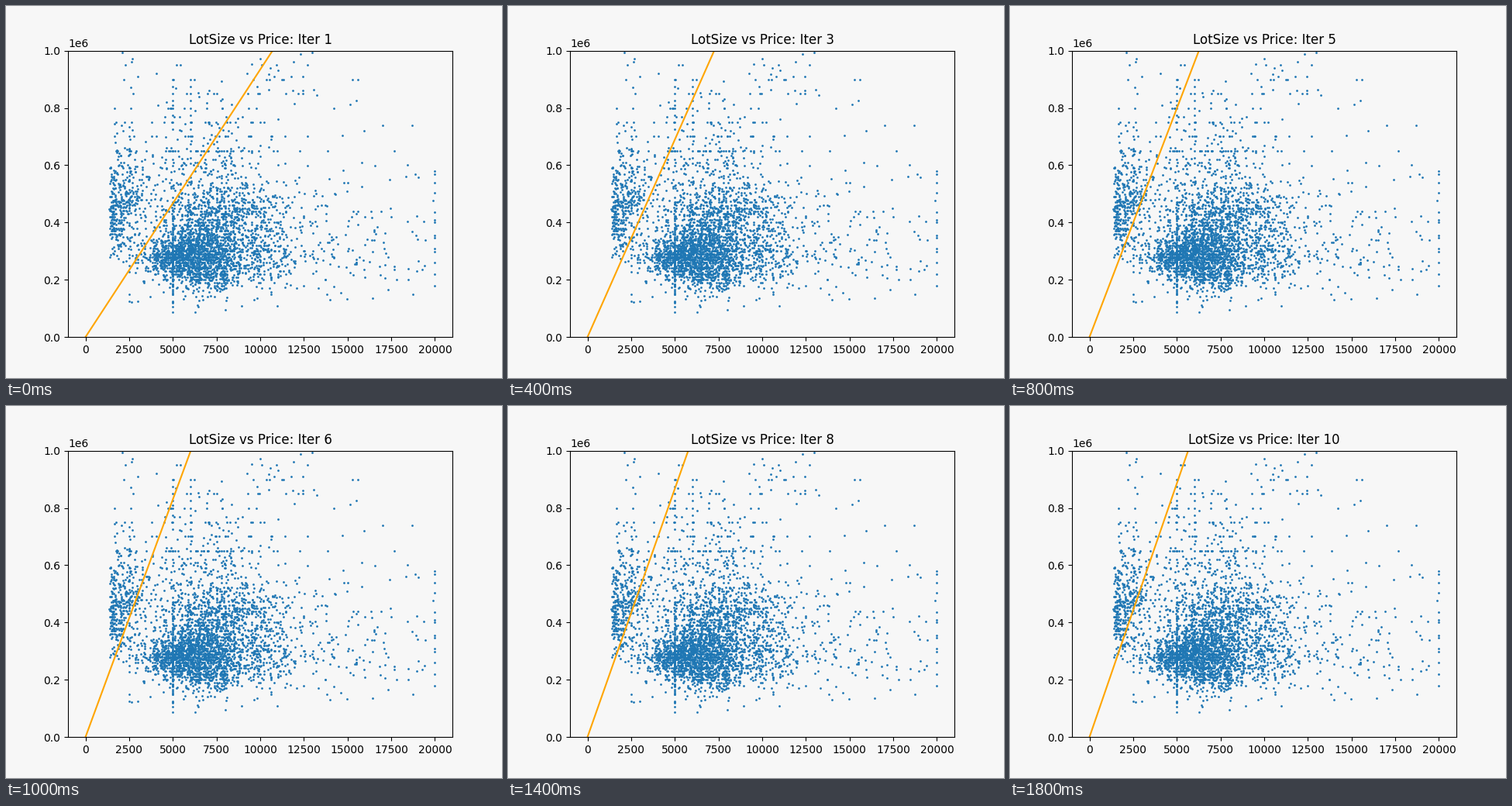
A matplotlib script that plays this animation: 640 by 480 pixels, repeating every 2.4 s.

```python
import numpy as np
import matplotlib.pyplot as plt
from matplotlib.animation import FuncAnimation

BG = "#f7f7f7"
STEPS = 10
FRAMES = 12          # the last step is held for three ticks
MAX_LOT = 20000

rng = np.random.default_rng(7)


def lognormal(median, sigma, n):
    return median * np.exp(rng.normal(0, sigma, n))


def above(low, mean, n):
    return low + rng.exponential(mean, n)


def snap(values, step, share):
    """Round a share of the values to a multiple of step."""
    chosen = rng.random(len(values)) < share
    return np.where(chosen, np.round(values / step) * step, values)


def scattered_sales():
    """Lot sizes and prices (in thousands) of all freely placed sales."""
    groups = [
        # dense core
        (rng.normal(5350, 750, 450), rng.normal(292, 38, 450)),
        (rng.normal(6850, 1050, 1250), lognormal(295, .28, 1250)),
        # larger lots and the tail to the right
        (rng.normal(8300, 1350, 480), lognormal(345, .3, 480)),
        (above(9500, 2500, 300), lognormal(320, .3, 300)),
        (rng.uniform(13000, 19900, 70), lognormal(330, .35, 70)),
        # higher prices above the core
        (rng.normal(7600, 1900, 270), above(420, 85, 270)),
        (rng.uniform(4500, 9500, 110), above(600, 150, 110)),
        (above(9000, 2600, 55), rng.uniform(600, 1000, 55)),
        # small expensive lots
        (1330 + rng.gamma(1.7, 420, 230), lognormal(420, .2, 230)),
        (1400 + rng.gamma(2, 600, 170), above(450, 150, 170)),
        # bridge between small lots and the core
        (rng.triangular(2300, 4600, 4900, 120), rng.normal(275, 35, 120)),
        (rng.uniform(2500, 5200, 70), rng.uniform(300, 600, 70)),
        # cheap outliers
        (rng.uniform(2500, 17000, 14), rng.uniform(84, 160, 14)),
    ]
    lot, price = (np.concatenate(part) for part in zip(*groups))
    lot = snap(lot, 500, .07)
    price = snap(price, 10, .3)
    price = np.where(price > 620, snap(price, 50, .4), price)

    keep = (lot > 1330) & (lot < MAX_LOT) & (price > 84) & (price < 1000)
    keep &= (lot > 2300) | (price > 235)
    return lot[keep], price[keep]


def common_lot_sales():
    """Sales that share one of the most common lot sizes."""
    columns = {
        2500: rng.uniform(110, 750, 18),
        5000: np.append(lognormal(290, .42, 85), np.arange(725, 925, 25)),
        6000: np.arange(625, 925, 25),
        MAX_LOT: lognormal(370, .32, 14),
    }
    lot = np.repeat(list(columns), [len(c) for c in columns.values()])
    return lot, np.concatenate(list(columns.values()))


def slope(step):
    """Gradient descent closes 30 % of the remaining gap at each step."""
    return 180.6 - 87.2 * 0.7 ** step


fig, ax = plt.subplots(figsize=(6.4, 4.8), dpi=100, facecolor=BG)
ax.set_facecolor(BG)
lot, price = np.hstack([scattered_sales(), common_lot_sales()])
ax.scatter(lot, price * 1000, s=1, color="tab:blue")
line, = ax.plot([], [], color="orange", lw=1.5)
ax.set_xlim(-1000, 21000)
ax.set_ylim(0, 1e6)
title = ax.set_title("")


def draw(i):
    step = min(i, STEPS - 1)
    line.set_data([0, MAX_LOT], [0, MAX_LOT * slope(step)])
    title.set_text(f"LotSize vs Price: Iter {step + 1}")
    return line, title


anim = FuncAnimation(fig, draw, frames=FRAMES, interval=200, repeat=True,
                     repeat_delay=0)
plt.show()
```
